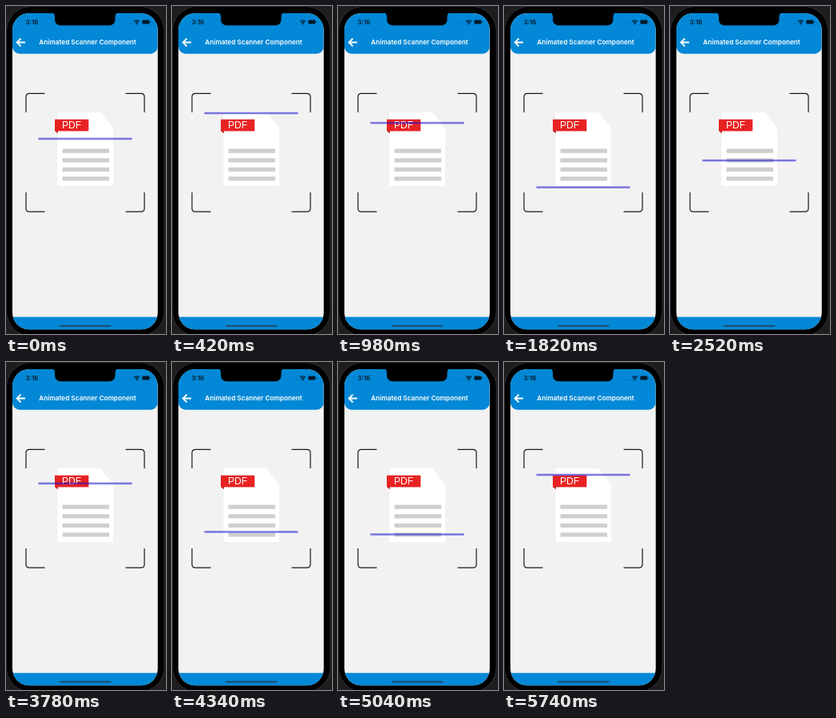
Animation, 200 px wide and 410 px high, one loop 5880 ms. Source, as an HTML page:

```html
<!DOCTYPE html>
<html lang="en">
<head>
<meta charset="utf-8">
<title>Scanner</title>
<style>
  html, body { margin: 0; width: 100%; height: 100%; overflow: hidden; background: #222; }
  svg { display: block; width: 200px; height: 410px; }
  text { font-family: Inter, "Liberation Sans", sans-serif; }
</style>
</head>
<body>
<svg viewBox="0 0 200 410">
  <defs>
    <clipPath id="screen"><rect x="8" y="9" width="181.7" height="395.3" rx="21"/></clipPath>
  </defs>

  <rect width="200" height="410" fill="#1e1e1e"/>
  <rect x=".5" y=".5" width="197.5" height="412" rx="31" fill="#000" stroke="#303030"/>

  <g clip-path="url(#screen)">
    <rect x="8" y="9" width="182" height="396" fill="#f2f2f2"/>
    <rect x="8" y="-10" width="181.7" height="69.7" rx="9" fill="#0288d6"/>
    <rect x="8" y="388.7" width="182" height="17" fill="#0288d6"/>
    <path d="M57 8 Q61 9 61 13 V16.5 Q61 24.3 69 24.3 H128.5 Q136.5 24.3 136.5 16.5 V13 Q136.5 9 140.5 8 Z" fill="#000"/>
    <rect x="67" y="398.8" width="64.5" height="2.2" rx="1.1" fill="#1d4f73"/>
  </g>

  <!-- status bar -->
  <text x="24.5" y="22.8" font-size="7.8" font-weight="600" fill="#04192a">3:16</text>
  <path d="M151 22.2h1.2M153 22.2h1.2M155 22.2h1.2M157 22.2h1.2" stroke="#0468a8" stroke-width="1"/>
  <g fill="none" stroke="#04192a" stroke-width="1.2">
    <path d="M160 19.2 Q163.5 16.4 167 19.2M161.5 20.9 Q163.5 19.2 165.5 20.9"/>
    <circle cx="163.5" cy="22.2" r=".4"/>
  </g>
  <rect x="170.3" y="17.5" width="9" height="4.9" rx="1.4" fill="#04192a"/>
  <rect x="179.7" y="19" width=".8" height="1.9" rx=".4" fill="#04192a"/>

  <!-- header -->
  <path d="M24 45.5H14M18.6 40.6L13.7 45.5L18.6 50.4" fill="none" stroke="#fff" stroke-width="1.9"/>
  <text x="102" y="48.3" font-size="8.2" font-weight="600" fill="#fff" text-anchor="middle">Animated Scanner Component</text>

  <!-- viewfinder -->
  <path fill="none" stroke="#1a1a1a" stroke-width="1.2" d="M25 133V113.5Q25 109.3 29.2 109.3H48.5
    M149.5 109.3H168.8Q173 109.3 173 113.5V133
    M173 233V253Q173 257.2 168.8 257.2H149.5
    M48.5 257.2H29.2Q25 257.2 25 253V233"/>

  <!-- document -->
  <path d="M64.5 133H118L134 153V225H64.5Z" fill="#fff"/>
  <path d="M61 156H64.8V159.3Z" fill="#b01c1c"/>
  <rect x="61" y="141.7" width="42.3" height="14.7" fill="#e82222"/>
  <text x="70" y="153.2" font-size="12" fill="#fff" style="font-family:'Liberation Sans',Arial,sans-serif">PDF</text>
  <path d="M70.5 181.2H129M70.5 192.9H129M70.5 204.4H129M70.5 215.9H129" stroke="#cfcfcf" stroke-width="5.2"/>

  <rect id="beam" x="40.5" y="-1.25" width="117" height="2.5" fill="#1b12d0" opacity=".56"/>
</svg>
<script>
  const LOOP = 5880, TOP = 133.6, BOTTOM = 229.6;
  const beam = document.getElementById('beam');

  // Sweeps between the ends, with short rests in between.
  const sweeps = [
    { start: -705, time: 1165, from: BOTTOM, to: TOP },
    { start: 703, time: 1241, from: TOP, to: BOTTOM },
    { start: 2034, time: 1149, from: BOTTOM, to: TOP },
    { start: 3435, time: 1241, from: TOP, to: BOTTOM },
    { start: 4759, time: 1177, from: BOTTOM, to: TOP }
  ];

  // cubic-bezier(.42, 0, 1, 1)
  function easeIn(x) {
    let lo = 0, hi = 1;
    for (let i = 0; i < 24; i++) {
      const s = (lo + hi) / 2;
      if (1.26 * s + 0.48 * s * s - 0.74 * s * s * s < x) lo = s; else hi = s;
    }
    return lo * lo * (3 - 2 * lo);
  }

  const easeInOut = p => p < 0.5 ? easeIn(2 * p) / 2 : 1 - easeIn(2 - 2 * p) / 2;

  function beamY(t) {
    const { start, time, from, to } = sweeps.filter(s => s.start <= t).pop();
    return from + (to - from) * easeInOut(Math.min(1, (t - start) / time));
  }

  function draw(t) {
    beam.setAttribute('transform', `translate(0 ${beamY(t).toFixed(2)})`);
  }

  const begin = performance.now();
  function tick() {
    draw((performance.now() - begin) % LOOP);
    requestAnimationFrame(tick);
  }
  tick();
</script>
</body>
</html>
```
